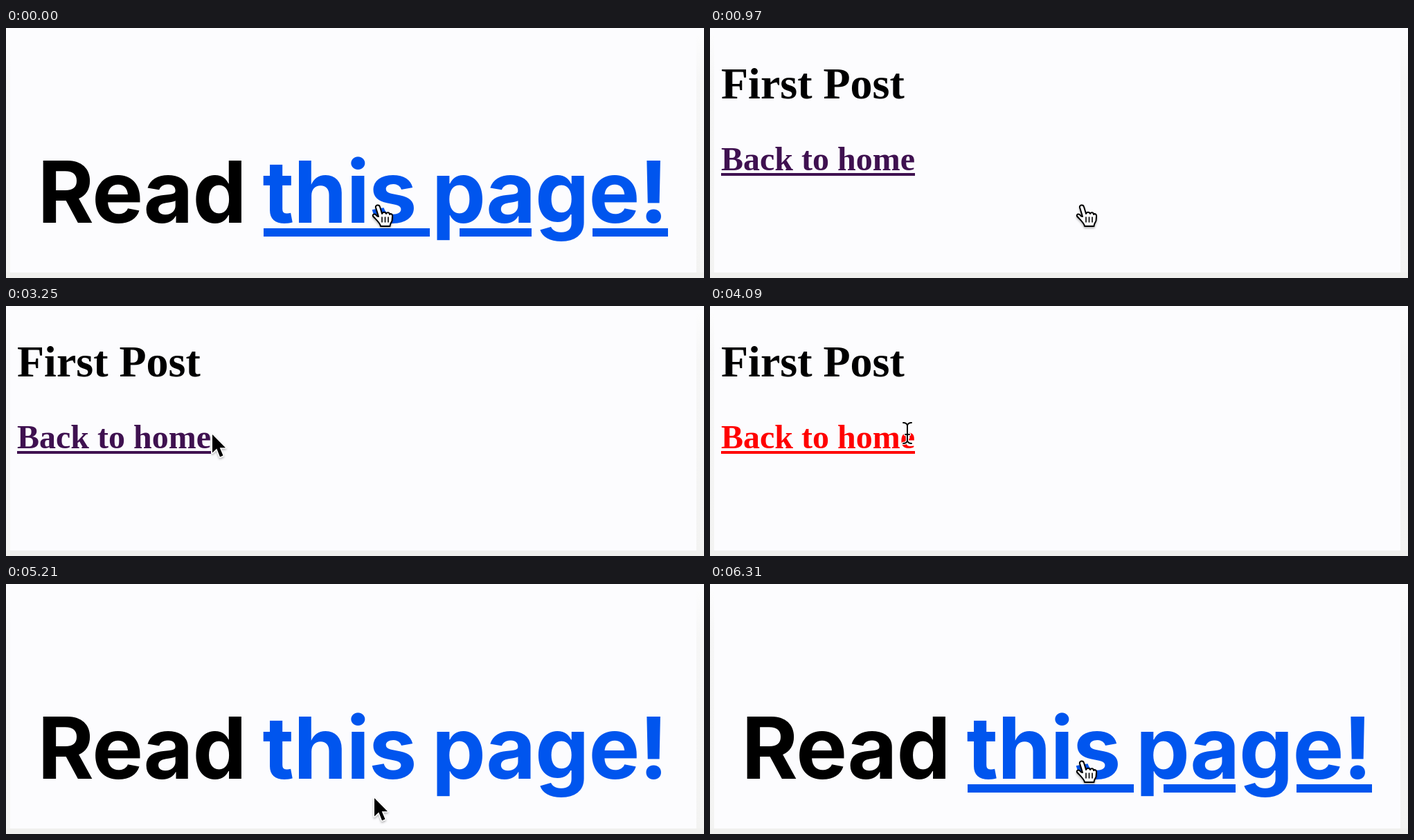
Animation, 1008 px wide and 362 px high, one loop 6.33 s. Source, as an HTML page:

```html
<!DOCTYPE html>
<html lang="en">
<head>
<meta charset="utf-8">
<title>Link navigation</title>
<style>
  html, body { margin: 0; width: 100%; height: 100%; overflow: hidden; background: #fcfcfe; }
  svg { display: block; width: 1008px; height: 362px; }

  .hero { font: 700 124px Inter, sans-serif; letter-spacing: -1px; text-anchor: middle; }
  .post { font-family: "Liberation Serif", "Times New Roman", serif; font-weight: 700; }
  .blue { fill: #0055ee; }

  .home, .post, .underline, .hand, .arrow, .beam { animation: 6.33s step-end infinite; }
  .home { animation-name: home; }
  .post { animation-name: post; }
  .underline { animation-name: underline; }
  .hand { animation-name: hand; }
  .arrow { animation-name: arrow; }
  .beam { animation-name: beam; }
  .back { fill: #3f1150; animation: press 6.33s step-end infinite; }
  .pointer { animation: travel 6.33s linear infinite; }

  @keyframes home { 0%, 68.7% { visibility: visible } 7.7% { visibility: hidden } }
  @keyframes post { 0%, 68.7% { visibility: hidden } 7.7% { visibility: visible } }
  @keyframes underline { 0%, 90% { opacity: 1 } 7.7% { opacity: 0 } }
  @keyframes press { 0%, 68.7% { fill: #3f1150 } 63.2% { fill: #f00 } }
  @keyframes hand {
    0%, 52.9%, 90% { visibility: visible }
    32.4%, 63.2% { visibility: hidden }
  }
  @keyframes arrow {
    0%, 52.9%, 90% { visibility: hidden }
    32.4%, 68.7% { visibility: visible }
  }
  @keyframes beam { 0%, 68.7% { visibility: hidden } 63.2% { visibility: visible } }
  @keyframes travel {
    0%, 32.4% { transform: translate(537px, 257px); animation-timing-function: ease-in }
    35.2% { transform: translate(508px, 251px); animation-timing-function: cubic-bezier(.3, .3, .6, 1) }
    51.3%, 52.9% { transform: translate(298px, 186px); animation-timing-function: ease-out }
    55.3%, 68.7% { transform: translate(285px, 183px); animation-timing-function: ease-in-out }
    80%, 84% { transform: translate(532px, 310px); animation-timing-function: ease-in-out }
    93%, 100% { transform: translate(537px, 257px) }
  }
</style>
</head>
<body>
<svg viewBox="0 0 1008 362">
  <defs>
    <linearGradient id="side" x2="0" y2="1">
      <stop stop-color="#fcfcfd"/>
      <stop offset=".2" stop-color="#f6f6f6"/>
      <stop offset="1" stop-color="#f3f3f2"/>
    </linearGradient>
    <filter id="shade" x="-50%" y="-50%" width="200%" height="200%">
      <feDropShadow dx="0" dy="2" stdDeviation="1.4" flood-opacity=".3"/>
    </filter>
    <path id="caret" d="M-6-14Q-1-14 0-10Q1-14 6-14M0-10V12M-6 16Q-1 16 0 12Q1 16 6 16M-3 3H3"/>
  </defs>

  <rect width="1008" height="362" fill="#fcfcfe"/>
  <path d="M0 10H6V354H0ZM997 10H1008V354H997Z" fill="url(#side)"/>
  <path d="M0 354H1008V362H0Z" fill="#f0f0ee"/>

  <g class="home">
    <g class="hero">
      <text x="196" y="282">Read</text>
      <g class="blue">
        <text x="481.5" y="282">this</text>
        <text x="785" y="282">page!</text>
      </g>
    </g>
    <path class="underline blue" d="M372 290H612V302H372ZM655 290H759V302H655ZM847 290H956V302H847Z"/>
  </g>

  <g class="post">
    <text x="16" y="102" font-size="64">First Post</text>
    <g class="back">
      <text x="16" y="206" font-size="48">Back to home</text>
      <path d="M16 210H296V214H16Z"/>
    </g>
  </g>

  <g class="pointer" stroke-linejoin="round" stroke-linecap="round">
    <g class="hand" fill="#fff" stroke="#000" stroke-width="2" filter="url(#shade)">
      <path d="M-3 3C-4-1 2-2 3 2L6 12C7 9 11 9 12 12C13 9 17 10 17 13C19 11 21.5 13 21 16L20.5 22C19.5 25 17.5 26 17.5 30L4 30C4 26-3 20-7 15.5C-8 12-4 11-1 15.5L1 16Z"/>
      <path d="M6 17V24M10.5 17V24M15 17V24" fill="none" stroke-width="1.6"/>
    </g>
    <path class="arrow" d="M0 0V26.5L6.3 20.6L11 32.5L15.5 30.6L10.7 19.2H19Z" stroke="#fff" stroke-width="2.6" paint-order="stroke" filter="url(#shade)"/>
    <g class="beam" fill="none">
      <use href="#caret" stroke="#fff" stroke-width="4.5"/>
      <use href="#caret" stroke="#000" stroke-width="2"/>
    </g>
  </g>
</svg>
</body>
</html>
```
